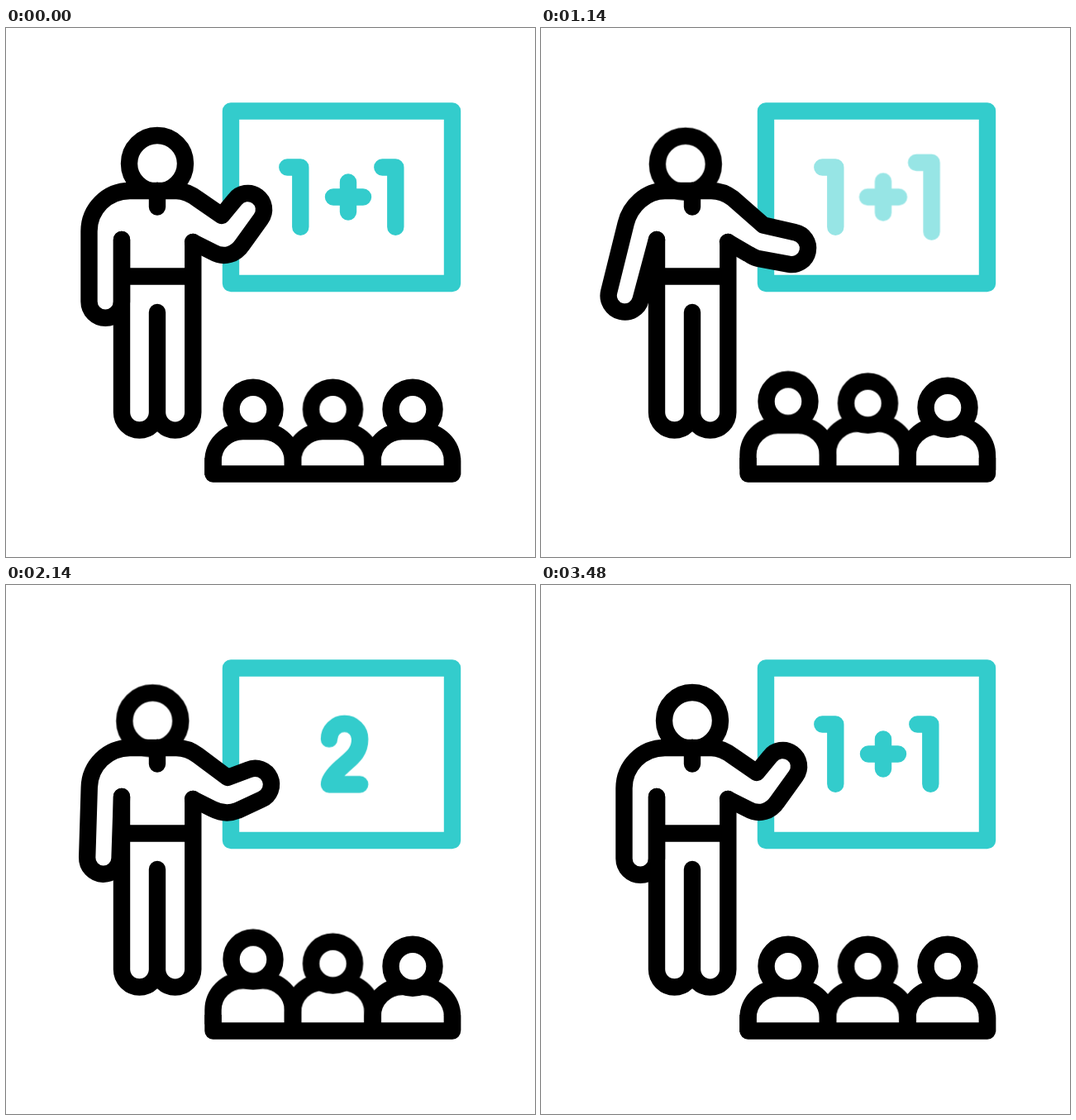
An HTML page without scripts that plays this animation: 640 px wide and 640 px high, repeating every 3.6 s.

```html
<!DOCTYPE html>
<html lang="en">
<head>
<meta charset="utf-8">
<title>Classroom</title>
<style>
html, body { margin: 0; width: 100%; height: 100%; overflow: hidden; background: #fff; }
svg { display: block; width: 640px; height: 640px; }
svg * { animation: 3600ms linear infinite; }
.ink, .teal { fill: none; stroke: #000; stroke-width: 20.4; stroke-linecap: round; stroke-linejoin: round; }
.teal { stroke: #3cc; }

/* Blackboard */
.sum { animation-name: sum; }
.answer { animation-name: answer; }
.pulse {
  animation-name: pulse;
  animation-delay: var(--at);
  transform-box: fill-box;
  transform-origin: center;
  vector-effect: non-scaling-stroke;
}
@keyframes sum { 0%, 28% { opacity: 1 } 35.5%, 89% { opacity: 0 } 96.5%, 100% { opacity: 1 } }
@keyframes answer { 0%, 35.8% { opacity: 0 } 42.2%, 82.5% { opacity: 1 } 89%, 100% { opacity: 0 } }
@keyframes pulse {
  0%, 25.6%, 100% { transform: scale(1); animation-timing-function: cubic-bezier(.37, 0, .63, 1) }
  12.8% { transform: scale(1.2); animation-timing-function: cubic-bezier(.37, 0, .63, 1) }
}

/* Teacher */
.head { animation-name: lean; animation-timing-function: cubic-bezier(.37, 0, .63, 1); }
.left-arm {
  d: path("M183 197H150C122 197 100.5 219 100.5 246L100.5 331A1 1 0 0 0 140 331L140 256");
  animation-name: swing;
}
.right-arm {
  fill: #fff;
  d: path("M183 197H206C216 197 224 201 232 207L261 227L276.7 208A1 1 0 0 1 308.3 231L286 262C278 274 264 279 250 271L226 259");
  animation-name: point;
}
@keyframes lean {
  0%, 73.3%, 100% { transform: none }
  22.2%, 51.1% { transform: translate(-8.2px, .6px) }
}
@keyframes swing {
  0% { animation-timing-function: cubic-bezier(.35, .05, .65, .9) }
  33.3% {
    d: path("M183 197H150C127 197 108.1 215 102.7 236.4L81.9 318.8A1 1 0 0 0 120.2 328.5L140 256");
    animation-timing-function: cubic-bezier(.35, .1, .65, .95);
  }
  66.7%, 100% { d: path("M183 197H150C122 197 100.5 219 100.5 246L100.5 331A1 1 0 0 0 140 331L140 256") }
}
@keyframes point {
  0% { animation-timing-function: ease-in }
  8.3%, 59.4% {
    d: path("M183 197H206C216 197 224 200 232 206L268 233L293.5 223.6A1 1 0 0 1 309.5 259.4L280 273C270 277 260 276 250 271L226 259");
  }
  59.4% { animation-timing-function: ease-out }
  20.6%, 47.2% {
    d: path("M183 197H206C216 197 224 200 232 206L272 239L308 238.5A1 1 0 0 1 309 277.6L272 279C264 279 256 276 250 272L226 259");
  }
  31.1%, 37.8% {
    d: path("M183 197H206C216 197 224 200 232 206L269 238.5L307.4 247.3A1 1 0 0 1 299.6 285.7L263 279C258 278 254 275 250 273L226 259");
  }
  69.4%, 100% {
    d: path("M183 197H206C216 197 224 201 232 207L261 227L276.7 208A1 1 0 0 1 308.3 231L286 262C278 274 264 279 250 271L226 259");
  }
}

/* Pupils: shoulders rise first, heads follow */
.shoulders, .face { animation-name: bob; animation-timing-function: cubic-bezier(.37, 0, .63, 1); }
.shoulders { stroke-linecap: butt; animation-delay: calc(var(--at) - 160ms); }
.face { fill: #fff; animation-delay: var(--at); }
@keyframes bob {
  0%, 32.2%, 64.4%, 100% { transform: none }
  16.1%, 48.3% { transform: translateY(-9.6px) }
}
</style>
</head>
<body>
<svg viewBox="0 0 640 640">
  <defs>
    <path id="one" d="M-8 -36.5H8V36.5"/>
  </defs>

  <g class="teal">
    <rect x="272" y="100.5" width="268" height="208.5"/>
    <g class="sum">
      <path class="pulse" style="--at:200ms" d="M340.3 168.5H356.3V240.8"/>
      <path class="pulse" style="--at:380ms" d="M396 204.5H432M414 186.5V222.5"/>
      <path class="pulse" style="--at:540ms" d="M455.3 168.5H471.3V240.8"/>
    </g>
    <g class="answer">
      <path class="pulse" style="--at:1270ms" d="M391 186.5A18.5 18.5 0 0 1 428 186.5C428 203 418 209 406 220C397 228 391 235 391 241H428"/>
    </g>
  </g>

  <g class="ink">
    <circle class="head" cx="183" cy="164" r="34"/>
    <path class="left-arm"/>
    <path class="right-arm"/>
    <path d="M140 256V465A21.5 21.5 0 0 0 183 465V344M183 465A21.5 21.5 0 0 0 226.3 465V259M140 300.5H226M183 197V216.500"/>
  </g>

  <g class="ink">
    <path stroke-linecap="butt" d="M250.500 520V539.500H540V520"/>
    <g style="--at:540ms">
      <path class="shoulders" d="M250.500 541V524A36 36 0 0 1 286.500 488H311A36 36 0 0 1 347 524V541"/>
      <circle class="face" cx="299" cy="461.300" r="26.500"/>
    </g>
    <g style="--at:750ms" transform="translate(96.500)">
      <path class="shoulders" d="M250.500 541V524A36 36 0 0 1 286.500 488H311A36 36 0 0 1 347 524V541"/>
      <circle class="face" cx="299" cy="461.300" r="26.500"/>
    </g>
    <g style="--at:960ms" transform="translate(193)">
      <path class="shoulders" d="M250.500 541V524A36 36 0 0 1 286.500 488H311A36 36 0 0 1 347 524V541"/>
      <circle class="face" cx="299" cy="461.300" r="26.500"/>
    </g>
  </g>
</svg>
</body>
</html>
```
